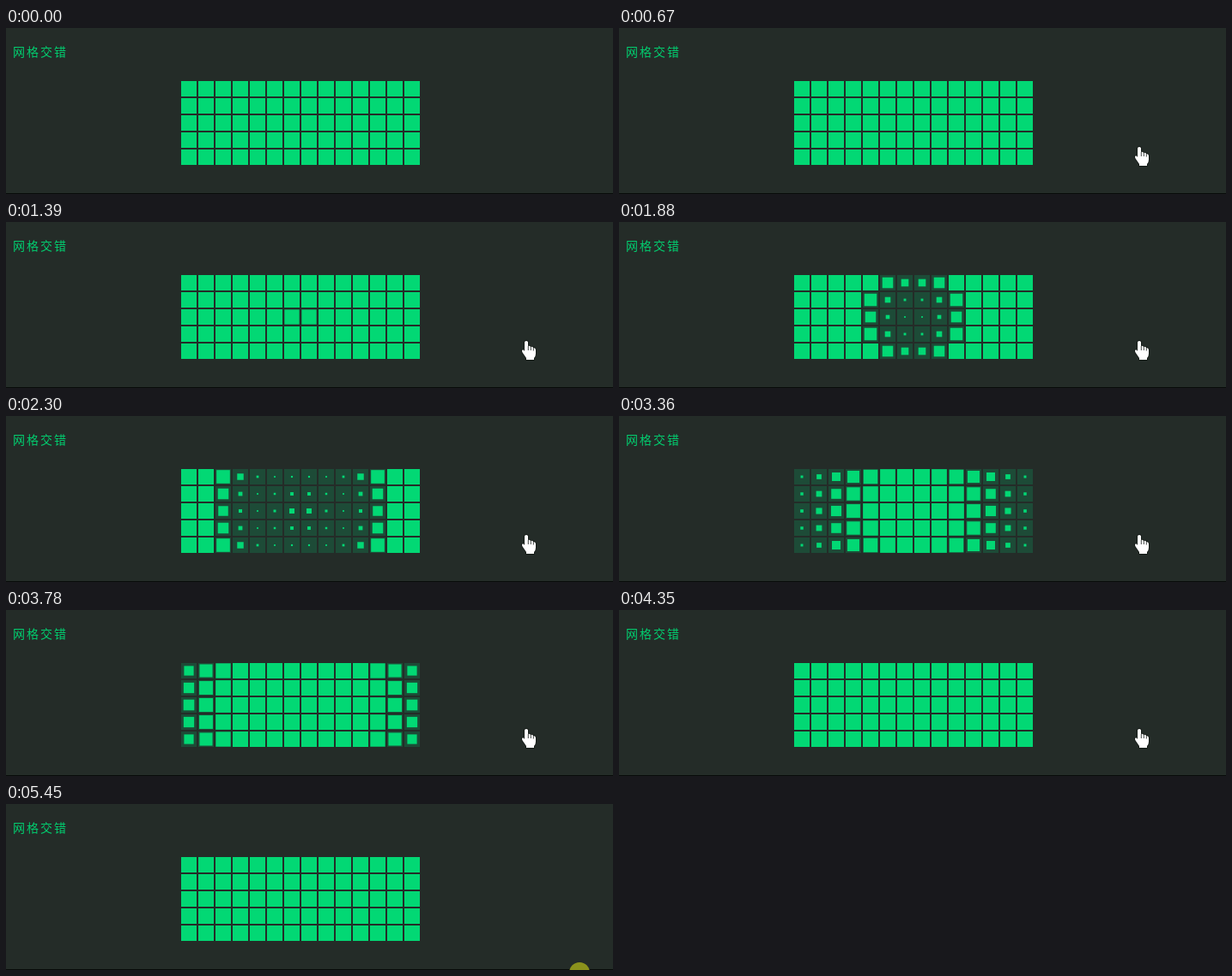
These frames come from a looping animation (707x194 px, 5.58 s). An HTML page with a canvas:

```html
<!DOCTYPE html>
<html lang="zh-CN">
<head>
<meta charset="utf-8">
<title>网格交错</title>
<style>
  html, body { margin: 0; width: 100%; height: 100%; overflow: hidden; background: #242c28; }
  canvas { position: absolute; left: 0; top: 0; display: block; }
  .title {
    position: absolute; left: 8px; top: 17px; color: #02cf70;
    font: 14px/20px "Noto Sans CJK SC", "Noto Sans CJK", sans-serif;
    letter-spacing: 2px; white-space: nowrap;
  }
</style>
</head>
<body>
<canvas id="stage" width="707" height="194"></canvas>
<div class="title">网格交错</div>
<script>
const ctx = document.getElementById('stage').getContext('2d');
const LOOP = 5580;
const COLS = 14, ROWS = 5, PITCH = 20, SIZE = 18, LEFT = 204, TOP = 62;
const REST = [606, 139];

const hold = (t, from, step) => from + Math.floor((t - from) / step + 0.1) * step;
const mix = (a, b, k) => a + (b - a) * k;
const outSine = k => Math.sin(k * Math.PI / 2);
const inOutQuad = k => k < 0.5 ? 2 * k * k : 1 - 2 * (1 - k) ** 2;

// Shrink to a tenth, then grow back
function scaleAt(t) {
  if (t <= 0 || t >= 1700) return 1;
  return t < 500 ? mix(1, 0.1, outSine(t / 500)) : mix(0.1, 1, inOutQuad((t - 500) / 1200));
}

function drawGrid(t) {
  const time = t < 1390 ? 0 : t >= 4350 ? LOOP : hold(t, 1390, 2960 / 42);
  for (let row = 0; row < ROWS; row++) {
    for (let col = 0; col < COLS; col++) {
      const delay = 200 * Math.hypot(col - (COLS - 1) / 2, row - (ROWS - 1) / 2);
      const size = SIZE * scaleAt(time - 1275 - delay);
      const x = LEFT + col * PITCH, y = TOP + row * PITCH, inset = (SIZE - size) / 2;
      if (size < SIZE) {
        ctx.fillStyle = '#1d4b37';
        ctx.fillRect(x, y, SIZE, SIZE);
      }
      ctx.fillStyle = '#02d874';
      ctx.fillRect(x + inset, y + inset, size, size);
    }
  }
}

function pointerAt(t) {
  if (t < 460 || t >= 5250) return null;
  if (t < 670) {
    const left = 1 - (hold(t, 460, 70) - 390) / 280;
    const k = left ** 1.6;
    return [mix(REST[0], 653, k), mix(REST[1], 198, k)];
  }
  if (t < 4690) return REST;
  const k = inOutQuad(Math.min(1, (hold(t, 4690, 70) - 4620) / 560));
  return [mix(REST[0], 666, k), mix(REST[1], 190, k)];
}

function drawClick(x, y) {
  ctx.fillStyle = '#8b921c';
  ctx.beginPath();
  ctx.arc(x, y, 12, 0, Math.PI * 2);
  ctx.fill();
}

const hand = new Path2D(
  'M-2 1.5Q-2 0 0 0Q2 0 2 1.5V6Q4 5.2 5 7Q7.4 6.2 8 8Q11 7.6 11 10.5V15' +
  'Q11 18 9 20V22H0V20L-4.6 13.2Q-5.6 11 -4.4 10.4Q-3 10 -2 12Z');
const gaps = new Path2D('M2.3 6V11M5.3 7V11M8.3 8V11.5');

function drawHand(x, y) {
  ctx.save();
  ctx.translate(x, y);
  ctx.strokeStyle = '#111713';
  ctx.lineWidth = 1.4;
  ctx.stroke(hand);
  ctx.fillStyle = '#fff';
  ctx.fill(hand);
  ctx.lineWidth = 0.8;
  ctx.stroke(gaps);
  ctx.restore();
}

function draw(t) {
  ctx.fillStyle = '#242c28';
  ctx.fillRect(0, 0, 707, 194);
  drawGrid(t);
  ctx.fillStyle = '#070b09';
  ctx.fillRect(0, 193, 707, 1);
  if (t >= 1130 && t < 1320) drawClick(606, 138);
  if (t >= 5450) drawClick(668, 197);
  const p = pointerAt(t);
  if (p) drawHand(...p);
}

const start = performance.now();
function tick() {
  draw((performance.now() - start) % LOOP);
  requestAnimationFrame(tick);
}
tick();
</script>
</body>
</html>
```
